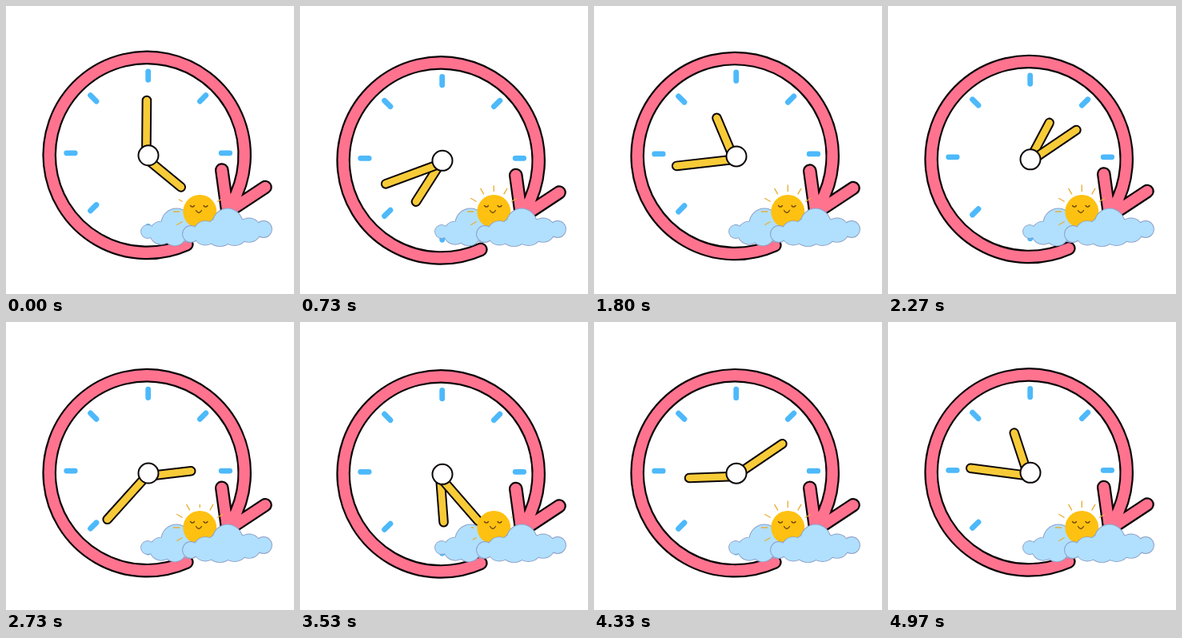
Recreate the animation shown at these times as an HTML page. Size 360 by 360 pixels, loop 5000 ms.

```html
<!DOCTYPE html>
<html lang="en">
<head>
<meta charset="utf-8">
<title>Clock and sun</title>
<style>
  html, body { margin: 0; width: 100%; height: 100%; overflow: hidden; background: #fff; }
  svg { display: block; width: 100vw; height: 100vh; }
  path { fill: none; stroke-linecap: round; stroke-linejoin: round; }
  .ink { stroke: #0b0508; }
  .edge { fill: none; stroke: #8f9fc6; stroke-width: 1.8; }
  .body { fill: #b0e0fe; }
</style>
</head>
<body>
<svg viewBox="0 0 360 360">
  <defs>
    <path id="ring"/>
    <path id="minute" d="M0 0V-72.6"/>
    <path id="hour" d="M0 0V-56.3"/>
    <g id="back"></g>
    <g id="front"></g>
  </defs>
  <g id="clock">
    <path id="ticks" stroke="#4db9fb" stroke-width="6.8"/>
    <use href="#ring" class="ink" stroke-width="17.6"/>
    <use href="#ring" stroke="#ff738f" stroke-width="13.2"/>
    <g class="hand"><use href="#hour" class="ink" stroke-width="12.6"/><use href="#hour" stroke="#f7cb38" stroke-width="8.6"/></g>
    <g class="hand"><use href="#minute" class="ink" stroke-width="12.6"/><use href="#minute" stroke="#f7cb38" stroke-width="8.6"/></g>
    <circle cx="178" cy="186.8" r="12.5" fill="#fff" class="ink" stroke-width="2"/>
  </g>
  <use href="#back" class="edge"/><use href="#back" class="body"/>
  <path id="rays" stroke="#eab03a" stroke-width="1.4"/>
  <circle cx="242.3" cy="257" r="21" fill="#fec111"/>
  <path stroke="#6b4310" stroke-width="1.3" d="M230.5 249.5q2.5 3.300 5 0m11.500 0q2.500 3.300 5 0m-14.500 6q3.500 6 7 0"/>
  <use href="#front" class="edge"/><use href="#front" class="body"/>
</svg>
<script>
const $ = id => document.getElementById(id);
const clamp = x => Math.max(0, Math.min(1, x));
const setPath = (id, d) => $(id).setAttribute('d', d);

// Point at an angle in degrees, clockwise from the right.
const polar = (x, y, r, deg) =>
  [x + r * Math.cos(deg * Math.PI / 180), y + r * Math.sin(deg * Math.PI / 180)];
const spoke = (x, y, r1, r2, deg) => `M${polar(x, y, r1, deg)}L${polar(x, y, r2, deg)}`;

// A row of puffs, largest in the middle, below one big top puff.
function cloud(id, n, [x1, y1], [x2, y2], small, grow, topX) {
  let puffs = `<circle cx="${topX}" cy="272" r="18.5"/>`;
  for (let i = 0; i < n; i++) {
    const u = i / (n - 1);
    const r = small + grow * Math.sin(Math.PI * u);
    puffs += `<circle cx="${x1 + (x2 - x1) * u}" cy="${y1 + (y2 - y1) * u}" r="${r}"/>`;
  }
  $(id).innerHTML = puffs;
}
cloud('back', 4, [177, 282], [228, 287], 8, 7, 213);
cloud('front', 6, [231, 285], [322, 279], 10, 8, 277);

const face = [176.2, 186.4, 122];
setPath('ring', `M${polar(...face, 66)}A122 122 0 1 1 ${polar(...face, 30)}M324 226.500L277 257.500L269.800 205`);
setPath('ticks', Array.from({ length: 8 }, (_, i) => spoke(177.7, 183.8, 91.5, 102, i * 45)).join(''));

const hands = document.querySelectorAll('.hand');
const CYCLE = 78; // poses per turn of the short hand

function draw(now) {
  // 25 poses a second shown on a 30 Hz grid
  const tick = Math.floor(now % 5000 * .03 + .12) % 150;
  const k = Math.floor(tick * 5 / 6);
  const m = k % CYCLE;

  const height = m < CYCLE / 2 ? 6.6 : 5.2;
  const dy = height * Math.abs(Math.sin(Math.PI * (m + .6) / 39)) ** 2.2;
  $('clock').setAttribute('transform', `translate(0 ${dy})`);

  [129.5 + k * 360 / CYCLE, .5 + k * 1080 / CYCLE].forEach((a, i) =>
    hands[i].setAttribute('transform', `translate(175.3 190.6) rotate(${a})`));

  // Rays grow from the sides up and shrink from the top down.
  const age = (m + CYCLE - 6) % CYCLE + 6;
  let rays = '';
  for (let i = 0; i < 7; i++) {
    const side = Math.abs(i - 4);
    const g = clamp(Math.min((age - 12 + 1.5 * side) / 7, (72 + 6 * side - age) / 10));
    if (g) rays += spoke(242.3, 257, 25.5, 25.5 + 7.5 * g, 150 + i * 30);
  }
  setPath('rays', rays);
}

const start = performance.now();
function loop() {
  draw(performance.now() - start);
  requestAnimationFrame(loop);
}
loop();
</script>
</body>
</html>
```
